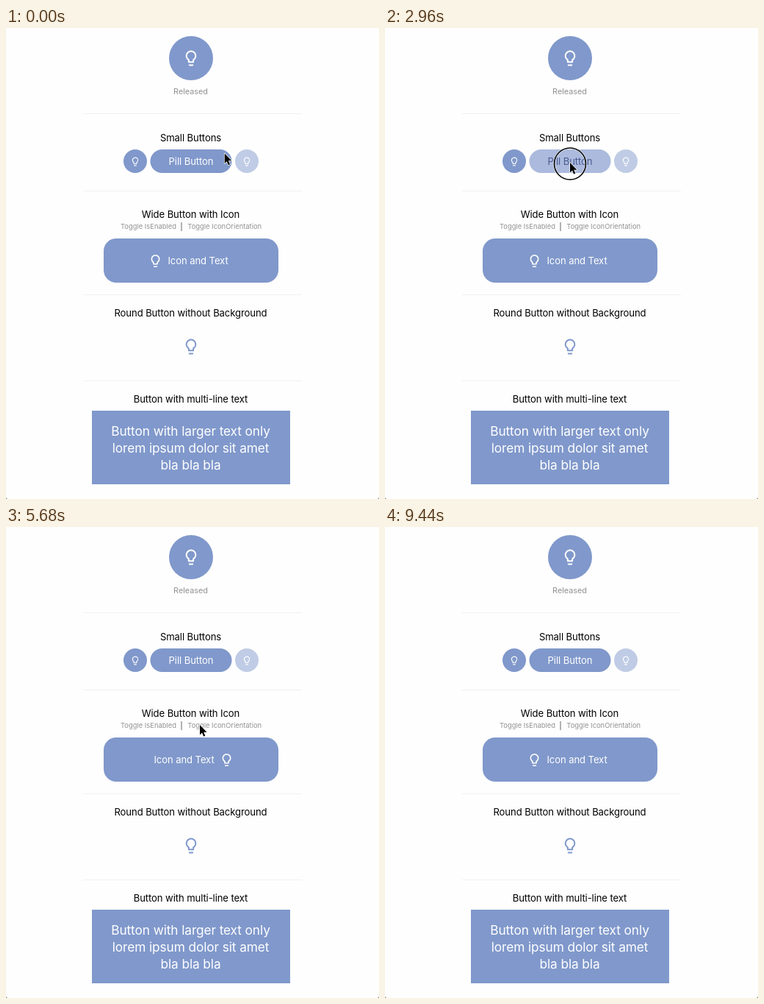
Write an HTML page with a canvas that moves like this. It is 508 px wide and 640 px high and loops after 9.52 s.

```html
<!DOCTYPE html>
<html lang="en">
<head>
<meta charset="utf-8">
<title>Button styles</title>
<style>
html, body { margin: 0; width: 100%; height: 100%; overflow: hidden; background: #fefefe; }
canvas { display: block; }
</style>
</head>
<body>
<canvas id="stage" width="508" height="640"></canvas>
<script>
const ctx = document.getElementById('stage').getContext('2d');
const LOOP = 9520, STEP = 80, MID = 252;
const STAY = 200, HOLD = 100, GAP = 240;
const BLUE = '#8098cb', PALE = '#c0cce5', LIGHT = '#abbadd', DARK = '#4b5c91', GREY = '#929292';
const HEAD = { size: 13.1, gap: -0.1 }, LARGE = { size: 17.3, gap: -0.1 };
const LABEL = { size: 10.9, gap: -0.05 }, TINY = { size: 9.4, gap: 0 };

// The pointer visits each control around time "at" and clicks it there
const stop = (at, x, y, clicks = 1) => ({ at, x, y, clicks, stay: STAY * clicks });
const tour = {
  enter: stop(-STAY, 303, 185, 0),
  round: stop(1000, MID, 46),
  small: stop(2240, 180, 179),
  pill: stop(2880, MID, 183),
  wide: stop(3600, 195, 293),
  enable: stop(4400, 194, 270, 2),
  orient: stop(5600, 264, 269, 2),
  bare: stop(7000, 254, 435),
  multi: stop(8800, 294, 538),
  leave: stop(9440, -14, 500, 0)
};
const stops = Object.values(tour);

const isDown = (s, t) => s.clicks === 2
  ? Math.abs(Math.abs(t - s.at) - GAP) < HOLD
  : s.clicks === 1 && Math.abs(t - s.at) < HOLD;

// The first of two clicks switches a toggle, the second switches it back
const isToggled = (s, t) => Math.abs(t - s.at) < GAP;

function pointer(t) {
  const i = stops.findIndex(s => t <= s.at + s.stay);
  if (i < 0) return null;
  const to = stops[i], from = stops[Math.max(0, i - 1)];
  const begin = from.at + from.stay, end = to.at - to.stay;
  const u = Math.min(1, Math.max(0, (t - begin) / (end - begin)));
  const e = u * u * (3 - 2 * u);
  return { x: from.x + (to.x - from.x) * e, y: from.y + (to.y - from.y) * e };
}

function text(str, x, y, { size, gap }, color) {
  ctx.font = `${size}px Inter, Roboto, sans-serif`;
  ctx.letterSpacing = gap + 'px';
  ctx.textAlign = 'center';
  ctx.fillStyle = color;
  ctx.fillText(str, x, y + size * 0.363);
}

function box(x, y, w, h, r, color) {
  ctx.fillStyle = color;
  ctx.beginPath();
  ctx.roundRect(x, y, w, h, r);
  ctx.fill();
}

const disc = (x, y, r, color) => box(x - r, y - r, 2 * r, 2 * r, r, color);

function bulb(x, y, scale, color) {
  ctx.save();
  ctx.translate(x, y);
  ctx.scale(scale, scale);
  ctx.translate(-12, -12);
  ctx.strokeStyle = color;
  ctx.lineWidth = 1.9;
  ctx.lineJoin = 'round';
  ctx.beginPath();
  ctx.arc(12, 9, 6, Math.PI * 2 / 3, Math.PI * 7 / 3);
  ctx.lineTo(15, 17);
  ctx.lineTo(9, 17);
  ctx.closePath();
  ctx.stroke();
  box(9, 20, 6, 2, [0, 0, 1, 1], color);
  ctx.restore();
}

const arrowShape = new Path2D('M0 0V13.4L3 10.6L5.1 15.6L7.3 14.7L5.2 9.8H9.5Z');

function arrow({ x, y }) {
  ctx.save();
  ctx.translate(x, y);
  ctx.lineJoin = 'round';
  ctx.strokeStyle = '#fff';
  ctx.lineWidth = 1.4;
  ctx.stroke(arrowShape);
  ctx.fillStyle = '#000';
  ctx.fill(arrowShape);
  ctx.restore();
}

function ring({ x, y }) {
  const outline = (width, color) => {
    ctx.beginPath();
    ctx.arc(x, y + 1.5, 21.5, 0, Math.PI * 2);
    ctx.lineWidth = width;
    ctx.strokeStyle = color;
    ctx.stroke();
  };
  outline(3, 'rgba(255,255,255,.7)');
  outline(1.6, '#000');
}

// Window corners showing the dark desktop behind
function corner(x, dir) {
  ctx.fillStyle = '#777';
  ctx.beginPath();
  ctx.moveTo(x, 637);
  ctx.quadraticCurveTo(x, 640, x + 3 * dir, 640);
  ctx.lineTo(x, 640);
  ctx.fill();
}

function draw(t) {
  const down = name => isDown(tour[name], t);
  const back = name => down(name) ? LIGHT : BLUE;
  const fore = name => down(name) ? DARK : '#fff';
  const title = (str, y) => text(str, MID - 0.5, y, HEAD, '#000');

  ctx.fillStyle = '#fefefe';
  ctx.fillRect(0, 0, 508, 640);
  ctx.fillStyle = '#f1f1f1';
  for (const y of [116, 221, 362, 479]) ctx.fillRect(105, y, 298, 1);

  disc(MID, 41, 30, back('round'));
  bulb(MID, 41, 1.05, fore('round'));
  text(down('round') ? 'Pressed' : 'Released', MID - 0.5, 86, LABEL, GREY);

  title('Small Buttons', 149);
  disc(MID - 76, 181, 16, back('small'));
  bulb(MID - 76, 181.5, 0.6, fore('small'));
  box(196.5, 165, 111, 32, 16, back('pill'));
  text('Pill Button', MID, 181, HEAD, fore('pill'));
  disc(MID + 76, 181, 16, PALE);
  bulb(MID + 76, 181.5, 0.6, '#fff');

  title('Wide Button with Icon', 253.5);
  text('Toggle IsEnabled', 194, 270, TINY, GREY);
  text('Toggle IconOrientation', 297.7, 270, TINY, GREY);
  ctx.fillStyle = '#666';
  ctx.fillRect(238.5, 264, 1, 12);
  const side = isToggled(tour.orient, t) ? -1 : 1;
  box(133, 286, 238, 60, 17, isToggled(tour.enable, t) ? PALE : back('wide'));
  bulb(MID - 48.5 * side, 316.5, 0.86, fore('wide'));
  text('Icon and Text', MID + 9.5 * side, 316.5, HEAD, fore('wide'));

  title('Round Button without Background', 387);
  if (down('bare')) disc(MID, 433, 30, BLUE);
  bulb(MID, 433, 1.05, down('bare') ? '#fff' : BLUE);

  title('Button with multi-line text', 504);
  box(117, 520, 270, 100, 0, back('multi'));
  ['Button with larger text only', 'lorem ipsum dolor sit amet', 'bla bla bla']
    .forEach((line, i) => text(line, MID - 0.5, 548 + i * 22.7, LARGE, fore('multi')));

  corner(0, 1);
  corner(508, -1);
  const hand = pointer(t);
  if (!hand) return;
  if (stops.some(s => isDown(s, t))) ring(hand);
  arrow(hand);
}

const start = performance.now();
function tick() {
  const t = (performance.now() - start) % LOOP;
  draw(Math.floor(t / STEP) * STEP);
  requestAnimationFrame(tick);
}
tick();
</script>
</body>
</html>
```
